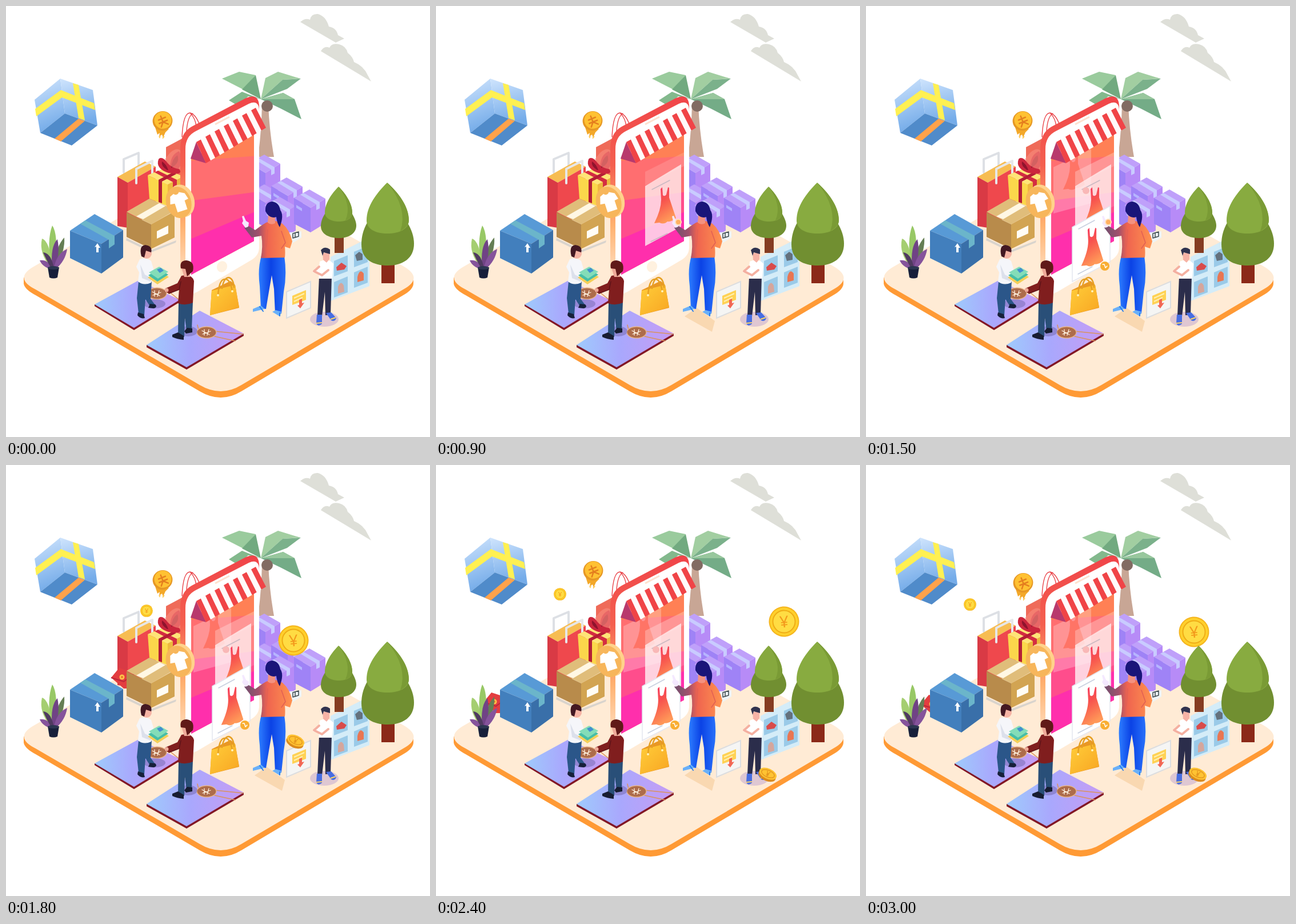
An HTML page that plays this animation: 742x754 px, repeating every 4.8 s.

```html
<!DOCTYPE html>
<html lang="en">
<head>
<meta charset="utf-8">
<title>Isometric shop</title>
<style>
html, body { margin: 0; width: 100%; height: 100%; overflow: hidden; background: #fff; }
svg { display: block; width: 742px; height: 754px; }
text { font-family: "Noto Sans", "DejaVu Sans", sans-serif; text-anchor: middle; }
.line { fill: none; stroke-linecap: round; stroke-linejoin: round; }
</style>
</head>
<body>
<svg viewBox="0 0 742 754">
<defs>
  <linearGradient id="mat"><stop stop-color="#9fcbfc"/><stop offset=".45" stop-color="#a9a8fd"/><stop offset="1" stop-color="#c79cf4"/></linearGradient>
  <linearGradient id="shell" x2="0" y2="1"><stop stop-color="#f04449"/><stop offset=".35" stop-color="#f4604f"/><stop offset=".65" stop-color="#ffb16f"/><stop offset="1" stop-color="#fff0e0"/></linearGradient>
  <linearGradient id="top"><stop stop-color="#70506f"/><stop offset=".3" stop-color="#a1506c"/><stop offset=".48" stop-color="#ef644f"/><stop offset="1" stop-color="#ff9350"/></linearGradient>
  <linearGradient id="jeans"><stop stop-color="#2d7dff"/><stop offset=".45" stop-color="#0b42e5"/><stop offset="1" stop-color="#2870fa"/></linearGradient>
  <linearGradient id="gown" x2=".4" y2="1"><stop stop-color="#f83968"/><stop offset=".45" stop-color="#f7524e"/><stop offset="1" stop-color="#ff9858"/></linearGradient>
  <linearGradient id="ice" x2=".2" y2="1"><stop stop-color="#cfe4fd"/><stop offset="1" stop-color="#75ace9"/></linearGradient>
  <linearGradient id="sack" x2="1" y2="1"><stop stop-color="#ffce3a"/><stop offset="1" stop-color="#f8a522"/></linearGradient>
  <clipPath id="screenClip"><path d="M324 266 434 218V411L324 470Z"/></clipPath>
  <g id="coin">
    <circle r="26.5" fill="#f5b51d"/><circle r="24.5" fill="#ffd02c"/>
    <circle r="19.5" fill="#ffdc43" stroke="#efac16" stroke-width="2"/>
    <text y="10" font-size="28" fill="#f39a1c">¥</text>
  </g>
  <path id="dress" d="M-4-34-3-20Q0-17 3-21L6-34 8-33 8-16 20 20Q12 27 5 26Q-1 32-9 28L-18 29Q-6 5-6-12L-7-31Z"/>
  <g id="seal">
    <ellipse rx="17" ry="10" fill="#ad6c4b" stroke="#e8b489" stroke-width="1.4"/>
    <path class="line" d="M-8-3 5 4M-4 5-4-5M1 5 4-5M-7 3 7-2" stroke="#fff1df" stroke-width="1.3"/>
  </g>
  <g id="crate">
    <path d="M0 15 27 0 55 16 29 32Z" fill="#bfa0fa"/>
    <path d="M0 15 29 32V75L0 60Z" fill="#9f83f6"/>
    <path d="M29 32 55 16V59L29 75Z" fill="#b78bf7"/>
    <path d="M11 9 17 6 45 22V33L39 36V26Z" fill="#c9cbff"/>
    <path d="M4 27 14 33V38L4 32Z" fill="#b6b5ff"/>
  </g>
</defs>

<g fill="#dedfd8">
  <path d="M515 28Q524 20 532 24Q534 13 546 14Q560 18 565 36Q578 38 581 51L592 57 577 64Z"/>
  <path d="M551 79Q557 69 566 73Q570 64 583 67Q595 70 598 82Q607 89 609 98Q626 105 633 121L639 132Z"/>
</g>

<!-- ground -->
<g id="ground">
  <path d="M31 475V486Q33 496 52 506L339 674Q376 696 412 674L695 506Q713 496 713 485V475Z" fill="#ff9a35"/>
  <path d="M50 455 330 295Q370 273 410 295L695 455Q732 476 695 496L412 663Q376 685 339 663L52 496Q12 476 50 455Z" fill="#ffebd5"/>
</g>

<!-- floating gift -->
<path d="M95 127 50 164 60 222 103 188Z" fill="url(#ice)"/>
<path d="M95 127 152 147 160 209 103 188Z" fill="url(#ice)"/>
<path d="M60 222 103 188 160 209 115 244Z" fill="#508bca"/>
<path d="M51 180 96 147 154 170 156 182 98 160 53 193Z" fill="#fff052"/>
<path d="M117 135 127 138 138 200 127 196Z" fill="#fff052"/>
<path d="M127 197 138 201 96 237 85 232Z" fill="#ffa24b"/>

<!-- palm -->
<path d="M448 172H459Q461 220 469 264H441Q447 220 448 172Z" fill="#c8a695"/>
<path d="M378 127 408 115 437 121 415 146Z" fill="#9acb9d"/>
<path d="M437 121 446 163 413 146Z" fill="#72aa80"/>
<path d="M390 165 413 150 446 163 424 158 405 174Z" fill="#83b98d"/>
<path d="M446 163 454 126 476 115 515 127 484 129Z" fill="#a2cea1"/>
<path d="M446 163 484 129 516 127 492 145Z" fill="#7bb18b"/>
<path d="M446 163 485 152 505 163 517 198 480 179Z" fill="#74ac87"/>
<path d="M446 163 485 152 505 163Z" fill="#98c79d"/>
<circle cx="457" cy="175" r="10" fill="#826b62"/>

<!-- stacked parcels -->
<use href="#crate" x="425" y="260"/><use href="#crate" x="425" y="312"/>
<use href="#crate" x="464" y="300"/><use href="#crate" x="452" y="334"/>
<use href="#crate" x="504" y="321"/>

<!-- left goods -->
<path d="M280 247 308 232V298L280 286Z" fill="#ef6b59"/>
<path class="line" d="M308 229Q310 187 322 187Q334 190 341 215M316 218Q318 193 327 188M323 188Q332 197 333 212" stroke="#e94349" stroke-width="1.4"/>
<path class="line" d="M206 291V268L232 257V283" stroke="#dde0e5" stroke-width="4"/>
<path d="M195 299 243 272 262 281 213 309Z" fill="#f7bd52"/>
<path d="M195 299 213 309V388L195 385Z" fill="#d93a45"/>
<path d="M213 309 262 281V360L213 388Z" fill="#ef484d"/>
<path class="line" d="M228 310V285L256 271V294" stroke="#e7e7e9" stroke-width="4"/>
<g id="letter">
  <path d="M-20-1-6-18 22-9 14 18 2 18Z" fill="#e33d40"/>
  <path d="M-20-1 2 6 22-9" fill="none" stroke="#bc2738" stroke-width="2"/>
  <circle cx="-1" cy="-2" r="4.5" fill="#ffc34a"/><circle cx="-1" cy="-2" r="2" fill="#e77a2e"/>
</g>
<path d="M248 296 276 284 310 298 283 312Z" fill="#ffe477"/>
<path d="M248 296 283 312V350L251 337Z" fill="#fbd74b"/>
<path d="M283 312 310 298V338L283 350Z" fill="#edb83e"/>
<path d="M260 291 266 288 299 304V340L292 344V308Z" fill="#d42d42"/>
<path d="M267 304 292 291 298 294 273 307V345L267 343Z" fill="#b51e36"/>
<path d="M284 292Q261 284 267 268Q273 260 287 279Q289 259 303 254Q312 272 302 284Q313 297 284 292Z" fill="#cb263d"/>
<path d="M282 287Q271 280 273 272Q280 276 284 287ZM289 283Q290 268 300 261Q305 275 289 283Z" fill="#8f142d"/>
<path d="M286 258Q300 244 308 256V286Q286 284 278 268Z" fill="#f78b7d" opacity=".65"/>
<path d="M211 406 254 427 298 410 297 414 254 431 210 410Z" fill="#d9d4cd"/>
<path d="M211 360 251 337 297 357 254 382Z" fill="#e0bd7a"/>
<path d="M211 361 254 382V425L211 404Z" fill="#b88b4b"/>
<path d="M254 382 295 359V405L254 425Z" fill="#d2a452"/>
<path d="M228 368 268 345 279 350 240 373Z" fill="#fff7e4"/>
<path d="M264 394 284 384V398L264 407Z" fill="#fffdf5"/>

<path d="M112 393 155 364 205 392 167 416Z" fill="#589ad6"/>
<path d="M112 393 167 416V468L112 441Z" fill="#427fbd"/>
<path d="M167 416 205 392V440L167 468Z" fill="#396fa9"/>
<path d="M130 381 139 375 190 402V417L180 424V409Z" fill="#6bb5ca"/>
<path d="M160 415 165 423H162V431H158V421L155 422Z" fill="#fff"/>

<!-- plant -->
<path d="M79 458Q71 410 81 384Q92 399 86 458Z" fill="#98c866"/>
<path d="M79 458Q57 433 63 407Q76 410 82 458Z" fill="#a5ce71"/>
<path d="M83 459Q87 421 102 405Q104 429 86 460Z" fill="#657e54"/>
<path d="M81 459Q77 421 90 408Q95 431 86 460Z" fill="#704385"/>
<path d="M84 460Q87 434 107 425Q104 446 87 460ZM80 460Q75 443 59 445Q64 457 81 461Z" fill="#85539b"/>
<path d="M79 459Q70 443 65 431Q79 432 84 459Z" fill="#4f3a60"/>
<path d="M73 457H93L90 475Q83 478 76 475Z" fill="#17203b"/><ellipse cx="83" cy="458" rx="10" ry="3" fill="#2b3650"/>

<!-- mats -->
<path d="M155 522V525L224 567 304 518V513Z" fill="#821726"/>
<path d="M155 522 232 480 304 514 224 563Z" fill="url(#mat)"/>
<path d="M246 593V597L316 636 416 577V573Z" fill="#821726"/>
<path d="M246 593 339 533 416 573 316 632Z" fill="url(#mat)"/>

<!-- phone -->
<path d="M305 494V250Q305 222 325 211L420 161Q443 151 443 177V420L335 499Q305 510 305 494Z" fill="url(#shell)"/>
<path d="M314 494V250Q314 228 332 219L425 171Q443 163 443 184V422Q443 436 430 444L335 500Q314 510 314 494Z" fill="#fff"/>
<path d="M366 207 391 194" stroke="#ffe1cf" stroke-width="3"/>
<g clip-path="url(#screenClip)">
  <path d="M320 210H440V480H320Z" fill="#ff8055"/>
  <path d="M320 271 440 262V480H320Z" fill="#ff6e70"/>
  <path d="M320 341 440 325V480H320Z" fill="#ff4d8c"/>
  <path d="M320 409 440 358V480H320Z" fill="#ff2fac"/>
  <g id="sideCard">
    <path d="M328 282 394 250V345L328 363Z" fill="#fff" opacity=".25"/>
    <use href="#dress" fill="#ff7466" transform="translate(363 292)"/>
    <path d="M366 290 434 256V350L366 384Z" fill="#fff" opacity=".14"/>
  </g>
  <g id="card">
    <path d="M366 290 434 256V280L366 314Z" fill="#fff" opacity=".14"/>
    <path d="M366 315 429 277V386L366 420Z" fill="#fff3f5" opacity=".76"/>
    <path class="line" d="M378 321 409 305M376 412 405 398" stroke="#c9b8c1" stroke-width="1.5"/>
    <use href="#dress" fill="url(#gown)" transform="translate(400 351)"/>
  </g>
  <circle id="dot" cx="385" cy="323" r="6" fill="#f9b8b7"/>
</g>
<g id="awning">
  <path d="M333 238 350 275 323 267Z" fill="#b83a6d"/>
</g>
<ellipse cx="378" cy="456" rx="9" ry="10" fill="#fff1df" transform="rotate(25 378 456)"/>
<g transform="rotate(-18 304 343)">
  <ellipse cx="308" cy="342" rx="22" ry="29" fill="#ffd28b"/>
  <ellipse cx="302" cy="343" rx="22" ry="28" fill="#f7b65b"/>
  <path d="M291 329 298 326Q303 332 308 326L317 331 320 342 313 343V359H295V343L287 342Z" fill="#fff"/>
</g>
<circle id="pulse" cx="407" cy="371" r="28" transform="translate(0 0)" fill="#ff9ac8" opacity=".65"/>
<g id="frontCard">
  <path d="M361 387 427 350V448L361 482Z" fill="#fff" stroke="#e4e6ef" stroke-width="1.5"/>
  <path class="line" d="M372 390 400 375M371 469 396 456" stroke="#c7cfdf" stroke-width="1.5"/>
  <use href="#dress" fill="url(#gown)" transform="translate(395 424) scale(1.02 1.06)"/>
  <circle cx="418" cy="455" r="8" fill="#f9ae32"/><path class="line" d="M414 452H417L419 458 422 455" stroke="#fff" stroke-width="1.5"/>
</g>

<!-- yellow bag -->
<path d="M360 497 393 481 401 488 408 528 357 541Z" fill="#e99724"/>
<path d="M360 498 401 488 408 527 357 541Z" fill="url(#sack)"/>
<path class="line" d="M371 506Q373 479 382 478Q392 476 396 499M378 494Q381 475 390 475Q398 477 399 492" stroke="#e6a023" stroke-width="2.5"/>
<circle cx="371" cy="506" r="2" fill="#fff2ba"/><circle cx="396" cy="499" r="2" fill="#fff2ba"/>

<!-- customers on the mats -->
<path class="line" d="M282 497 303 514M335 558Q339 581 361 577L401 586M365 569 415 574" stroke="#d9935f" stroke-width="1.5"/>
<use href="#seal" x="351" y="571"/><use href="#seal" x="264" y="503"/>
<ellipse cx="260" cy="521" rx="19" ry="8" fill="#7164a9" opacity=".48"/>
<path d="M232 482H255L253 512 261 523 253 527 244 513 242 541 232 538 229 511Z" fill="#2b5689"/>
<path d="M231 536 241 539 243 546Q235 548 230 541ZM252 521 261 522Q266 527 258 529L249 528Z" fill="#17203a"/>
<path d="M234 443Q244 439 254 446L259 463 254 484Q241 490 231 482L233 466 228 456Z" fill="#f5f6fa"/>
<path d="M235 452 243 470 255 476 253 482 238 476Z" fill="#dce0eb"/>
<circle cx="246" cy="433" r="9" fill="#f6b4a5"/><path d="M237 438Q232 419 244 418Q257 420 254 431L245 428 242 440Z" fill="#431823"/>
<path d="M248 475 268 464 285 474 265 487Z" fill="#f3cf58"/><path d="M249 471 268 460 284 470 265 482Z" fill="#46bea7"/><path d="M250 466 268 456 284 465 266 477Z" fill="#83ddb8"/>
<path d="M264 461 271 458 276 463 269 467Z" fill="#438fce"/>

<ellipse cx="319" cy="569" rx="16" ry="9" fill="#7263ac" opacity=".5"/>
<path d="M302 518 327 518 325 565 316 569 313 546 312 579 301 576Z" fill="#294f78"/>
<path d="M301 571 311 577V584Q299 583 291 579V575ZM317 563 326 564V571L315 573 312 569Z" fill="#171d32"/>
<path d="M307 472Q325 468 329 481L327 519Q314 525 301 520L303 496 285 503 277 499 279 494 300 485Z" fill="#801e1e"/>
<path d="M306 482 303 496 285 503" class="line" stroke="#5f1319" stroke-width="1.5"/>
<circle cx="281" cy="497" r="3.5" fill="#edaa97"/>
<path d="M307 458H322V474H312Z" fill="#efaa98"/><path d="M306 459Q303 445 316 445Q331 447 327 464L317 473 314 460Z" fill="#611918"/>

<!-- shopper -->
<path id="shade" d="M435 543 456 528 488 551 483 570Z" fill="#f9d8b1"/>
<path d="M479 402 497 396 517 394V405L493 420 480 416Z" fill="#eef4f7"/>
<path class="line" d="M502 398 512 395V403L502 406ZM506 397V404M482 409 489 412V417" stroke="#3c494e" stroke-width="1.5"/>
<path d="M447 437H487Q492 470 486 500L482 538H471L469 495 465 471 460 500 455 530 446 529 444 490Q440 460 447 437Z" fill="url(#jeans)"/>
<path d="M446 524 432 530V535L453 530ZM472 532 466 535 479 543 482 535Z" fill="#69b0f8"/>
<path d="M444 526 450 534M479 537V542" class="line" stroke="#247bf0" stroke-width="2"/>
<path d="M455 379Q470 372 484 381Q497 392 501 412L497 424 488 421Q489 432 488 440L446 441Q450 420 447 402L430 405 417 388 423 384 436 392 447 384Z" fill="url(#top)"/>
<path class="line" d="M482 394 489 414 482 424M458 391 456 422" stroke="#e26054" stroke-width="1.6"/>
<path id="hand" d="M419 388 413 380 415 376 413 368 416 367 420 376 425 379 424 386Z" fill="#f4e9ff"/>
<circle id="tap" cx="424" cy="378" r="5" fill="#ffb061" stroke="#ffe1bb" stroke-width="2"/>
<path d="M459 365H471V380Q464 384 458 379Z" fill="#f49180"/>
<path d="M454 359Q453 343 466 342Q478 344 480 357Q487 366 479 387Q474 379 473 369Q461 373 454 359Z" fill="#191579"/>

<!-- poster, display and visitor -->
<path d="M491 500 533 482V528L491 546Z" fill="#f5f5f4" stroke="#dcdddf" stroke-width="2"/>
<path d="M501 507 525 497V514L501 523Z" fill="#ffd255"/><path d="M504 511 522 503M504 517 519 510" stroke="#fff1b5" stroke-width="2"/>
<path d="M513 514 518 512V520L522 519 515 529 510 524 513 523Z" fill="#f26855"/>
<path d="M568 439 636 405V490L568 516Z" fill="#d4ecf8"/>
<g id="tiles"></g>
<path d="M578 457 587 449 596 455 592 461 579 463Z" fill="#d94b4a"/><path d="M611 436 618 430 624 434V444L614 446Z" fill="#64717d"/>
<path d="M581 491Q586 479 591 489L592 500 581 503Z" fill="#d5a69c"/><path d="M615 474Q619 458 626 468V480L615 483Z" fill="#e87653"/>

<ellipse cx="557" cy="548" rx="25" ry="13" fill="#dfc7d2"/>
<path d="M548 473H570L568 540 559 541 558 500 553 543 545 542Z" fill="#2b2d4b"/>
<path d="M544 540H553V556Q546 562 543 555ZM560 537 569 536 578 546Q576 553 569 550Z" fill="#476de1"/>
<path d="M543 555 553 554M568 548 577 545" stroke="#ffd466" stroke-width="2"/>
<path d="M549 447Q564 440 573 451L571 477H547L548 469 537 466 541 459 548 457Z" fill="#fff"/>
<path d="M548 456 539 464 553 471 564 462" class="line" stroke="#f4b0a1" stroke-width="4"/>
<path d="M554 432H566V443L561 449 555 444Z" fill="#f6b3a5"/><path d="M551 427Q558 419 567 426L567 434 556 431 554 437Z" fill="#30334f"/>

<g id="bigCoin"><use href="#coin" transform="rotate(-5)"/></g>

<!-- trees -->
<path d="M575 403H591V432H575Z" fill="#853c21"/>
<path d="M582 340C560 355 551 372 551 385C551 400 567 406 582 406C600 406 613 398 613 384C613 372 600 350 582 340Z" fill="#718f31"/>
<path d="M582 316C570 328 558 345 558 361C558 372 570 377 582 377C596 377 606 372 606 362C606 345 594 328 582 316Z" fill="#86a83e"/>
<path d="M582 316C594 328 606 345 606 362C606 368 601 373 594 375Q606 348 582 316Z" fill="#7a9b35"/>
<path d="M657 447H680V485H657Z" fill="#8b2918"/>
<path d="M667 343C635 366 622 390 622 417C622 444 643 454 668 454C695 454 714 441 714 416C714 391 697 364 667 343Z" fill="#718f31"/>
<path d="M667 309C648 328 631 350 631 375C631 391 648 398 667 398C689 398 705 390 705 375C705 350 686 326 667 309Z" fill="#88ab40"/>
<path d="M667 309C686 326 705 350 705 375C705 383 697 390 690 394Q704 354 667 309Z" fill="#7a9b35"/>

<!-- small airborne pieces -->
<g id="flatCoin">
  <g transform="rotate(24)"><ellipse cy="4" rx="16" ry="9" fill="#db8b1d"/><ellipse rx="16" ry="9" fill="#ffc332"/><ellipse rx="12" ry="6" fill="none" stroke="#e69a20" stroke-width="1.5"/><text y="5" font-size="13" fill="#dd8a18">¥</text></g>
</g>
<g id="smallCoin"><use href="#coin" transform="scale(.41)"/></g>
<g id="balloon">
  <path d="M-14 8-9 24-5 21-6 27-1 24 1 29 5 20 11 14Z" fill="#f3a829"/>
  <path d="M-7 27-3 26-5 31ZM0 27 4 27 0 32Z" fill="#ffca57"/>
  <g transform="rotate(-22)"><ellipse rx="17.5" ry="17" fill="#e69725"/><ellipse cx="1" cy="-1" rx="15" ry="15" fill="#ffc132"/><path class="line" d="M-6-4H7M-7 2H8M0-9V2L-6 9M0 2 7 9" stroke="#e47e1e" stroke-width="2.5"/></g>
</g>
</svg>
<script>
const $ = id => document.getElementById(id);
const SVG = "http://www.w3.org/2000/svg";
const STEP = 300, LOOP = 4800, LAST = 10;

function poly(parent, points, fill) {
  const p = document.createElementNS(SVG, "polygon");
  p.setAttribute("points", points.map(q => q.join()).join(" "));
  p.setAttribute("fill", fill);
  $(parent).append(p);
}

// Awning stripes follow the phone's slope.
const STRIPES = 13;
for (let i = 0; i < STRIPES; i++) {
  const a = i / STRIPES, b = (i + 1) / STRIPES;
  const upper = u => [333 + 104 * u, 238 - 60 * u];
  const lower = u => [350 + 105 * u, 275 - 62 * u];
  poly("awning", [upper(a), upper(b), lower(b), lower(a)], i % 2 ? "#fffafa" : "#f04447");
}

for (const [x, y] of [[574, 446], [609, 430], [574, 483], [609, 466]])
  poly("tiles", [[x, y], [x + 24, y - 10], [x + 24, y + 18], [x, y + 27]], "#9acae8");

// Inclusive ranges of steps.
const visible = {
  pulse: [2, 2], card: [3, LAST], tap: [3, 5], shade: [3, LAST],
  sideCard: [4, LAST], dot: [4, LAST], frontCard: [5, LAST]
};

// Step, x, y; positions hold until the next entry.
const moves = {
  bigCoin: [[6, 503, 307], [7, 580, 286], [8, 609, 274], [9, 580, 288], [10, 574, 292]],
  smallCoin: [[6, 246, 255], [7, 232, 236], [8, 217, 226], [9, 199, 235], [10, 182, 244]],
  letter: [[6, 204, 373], [7, 117, 411], [8, 103, 416], [9, 114, 419], [10, 116, 420]],
  flatCoin: [[6, 507, 482], [7, 581, 540]],
  balloon: [[0, 274, 201], [8, 275, 185], [9, 275, 201], [10, 275, 206]]
};

function show(id, on) { $(id).style.display = on ? "" : "none"; }

function draw(step) {
  for (const [id, [from, to]] of Object.entries(visible)) show(id, step >= from && step <= to);
  for (const [id, keys] of Object.entries(moves)) {
    const key = keys.filter(k => k[0] <= step).pop();
    show(id, key);
    if (key) $(id).setAttribute("transform", `translate(${key[1]} ${key[2]})`);
  }
}

let shown = -1;
const start = performance.now();
function tick(now) {
  const time = Math.max(0, now - start) % LOOP;
  const step = Math.min(LAST, Math.floor(time / STEP));
  if (step !== shown) draw(shown = step);
  requestAnimationFrame(tick);
}
draw(0);
requestAnimationFrame(tick);
</script>
</body>
</html>
```
